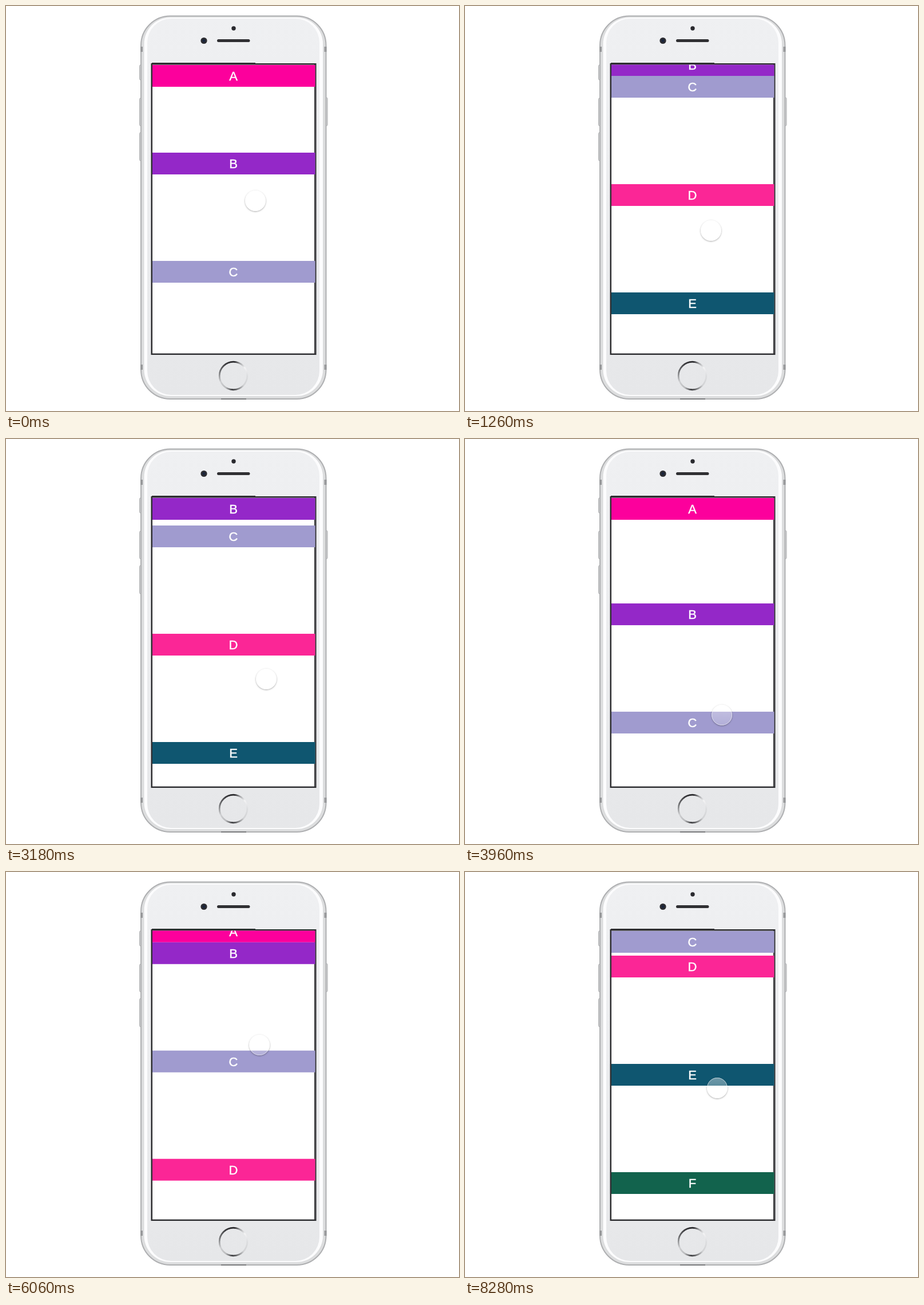
An HTML page with a canvas for the animation above (8340 ms loop, 792x707 px).

```html
<!DOCTYPE html>
<html lang="en">
<head>
<meta charset="utf-8">
<title>Sticky headers</title>
<style>
  html, body { margin: 0; width: 100%; height: 100%; overflow: hidden; background: #fff; }
  canvas { display: block; width: 792px; height: 707px; }
</style>
</head>
<body>
<canvas id="stage" width="792" height="707"></canvas>
<script>
const ctx = document.getElementById('stage').getContext('2d');
const LOOP = 8340, STEP = 60;
const TOP = 103, BAR = 38, SECTION = 189;
const colors = ['#fc009c', '#9428c8', '#a09bcf', '#fb2696', '#0f5670', '#12634d'];

// time, scroll offset, touch x, touch y
const keys = [
  [0, 36, 436, 340], [360, 150, 440, 226], [600, 215, 438, 270],
  [1060, 311, 428, 440], [1260, 359, 430, 392], [1560, 510, 440, 241],
  [1860, 590, 440, 330], [2160, 622, 450, 300], [2520, 647, 469, 173],
  [2820, 500, 462, 320], [3180, 330, 455, 419], [3500, 170, 452, 470],
  [3800, 45, 450, 480], [4020, 0, 449, 482], [4140, 0, 449, 482],
  [5220, 0, 423, 436], [5900, 146, 440, 290], [6240, 190, 445, 330],
  [6780, 235, 438, 456], [7020, 290, 445, 401], [7380, 405, 452, 286],
  [7740, 460, 446, 330], [8100, 480, 438, 421], [8280, 524, 441, 377]
];

function slope(i, c) {
  const a = keys[i], b = keys[i + 1];
  return a && b ? (b[c] - a[c]) / (b[0] - a[0]) : null;
}

// Monotone tangent: flat at turning points
function tangent(i, c) {
  const l = slope(i - 1, c), r = slope(i, c);
  if (l === null) return r;
  if (r === null) return l;
  return l * r <= 0 ? 0 : 2 * l * r / (l + r);
}

function valueAt(t, c) {
  let i = 0;
  while (i < keys.length - 2 && keys[i + 1][0] <= t) i++;
  const a = keys[i], b = keys[i + 1], h = b[0] - a[0];
  const u = Math.min(1, (t - a[0]) / h), v = 1 - u;
  return v * v * (1 + 2 * u) * a[c] + u * u * (3 - 2 * u) * b[c]
    + h * u * v * (v * tangent(i, c) - u * tangent(i + 1, c));
}

function rect(x, y, w, h, fill) {
  ctx.fillStyle = fill;
  ctx.fillRect(x, y, w, h);
}

function round(x, y, w, h, r, fill, stroke, line = 1) {
  ctx.beginPath();
  ctx.roundRect(x, y, w, h, r);
  if (fill) { ctx.fillStyle = fill; ctx.fill(); }
  if (stroke) { ctx.strokeStyle = stroke; ctx.lineWidth = line; ctx.stroke(); }
}

function disc(x, y, r, fill) {
  ctx.beginPath();
  ctx.arc(x, y, r, 0, Math.PI * 2);
  ctx.fillStyle = fill;
  ctx.fill();
}

function ramp(gradient, stops) {
  stops.forEach(([at, color]) => gradient.addColorStop(at, color));
  return gradient;
}

function drawBody() {
  [[233.5, 103, 26], [233.5, 161, 48], [233.5, 221, 49], [558, 160, 49]].forEach(
    ([x, y, h]) => round(x, y, 4, h, 1.5, '#dedfe0', '#a4a5a7'));

  round(236, 17.5, 323.5, 668.5, 51, '#dcddde', '#aeafb1', 2);
  [71, 626].forEach(y => {
    rect(235, y, 4, 9, '#98999b');
    rect(556.5, y, 4, 9, '#98999b');
  });
  rect(376, 685, 44, 2, '#77787a');

  round(241.5, 20, 312.5, 661, 46, '#fcfcfd');
  const face = ramp(ctx.createLinearGradient(0, 22, 0, 680), [[0, '#eff0f2'], [1, '#e6e7e9']]);
  round(247, 22, 301, 657, 42, face);

  disc(398, 39, 3.7, '#29292e');
  disc(346, 60.5, 5.6, '#2b2c32');
  disc(346, 60.5, 2.4, '#18243c');
  round(369, 58, 57.5, 5, 2.5, '#303033');
}

function drawHome() {
  const ring = ramp(ctx.createConicGradient(0, 397.5, 645.5), [
    [0, '#dcdddf'], [.12, '#d2d3d5'], [.2, '#77787a'], [.26, '#38383b'],
    [.34, '#b9babc'], [.43, '#cfd0d2'], [.54, '#77787a'], [.66, '#3a3a3d'],
    [.76, '#222225'], [.83, '#a5a6a8'], [.9, '#f4f4f5'], [1, '#dcdddf']
  ]);
  ctx.beginPath();
  ctx.arc(397.5, 645.5, 24.3, 0, Math.PI * 2);
  ctx.strokeStyle = ring;
  ctx.lineWidth = 2.7;
  ctx.stroke();
}

function drawScreen() {
  rect(253.5, 100, 289, 509, '#2d2d30');
  rect(255, 99, 181, 2, '#2d2d30');
  rect(256, 102.6, 283, 503.9, '#fff');
  rect(540.2, 102.6, .7, 504, '#77787a');
}

function drawBar(i, y) {
  rect(256, y, 284.5, BAR, colors[i]);
  const letter = String.fromCharCode(65 + i);
  ctx.fillStyle = ctx.strokeStyle = '#fff';
  ctx.lineWidth = .45;
  ctx.fillText(letter, 397.5, y + 27);
  ctx.strokeText(letter, 397.5, y + 27);
}

function drawBars(scroll) {
  ctx.save();
  ctx.beginPath();
  ctx.rect(255, TOP - .4, 287, 504.4);
  ctx.clip();
  ctx.font = '22px "Liberation Sans", Arial, sans-serif';
  ctx.textAlign = 'center';
  for (let i = 0; i < colors.length; i++) {
    const flow = TOP + SECTION * i - scroll;
    const next = i < colors.length - 1 ? flow + SECTION : Infinity;
    const y = Math.min(Math.max(flow, TOP), next - BAR);
    if (y > TOP - BAR && y < 608) drawBar(i, y);
  }
  ctx.restore();
}

function drawTouch(x, y) {
  const r = 18;
  ctx.save();
  ctx.beginPath();
  ctx.rect(x - 40, y - 40, 80, 80);
  ctx.arc(x, y, r, 0, Math.PI * 2);
  ctx.clip('evenodd');
  ctx.shadowColor = 'rgba(0,0,0,.42)';
  ctx.shadowBlur = 3;
  ctx.shadowOffsetY = 1;
  disc(x, y, r - .3, '#fff');
  ctx.restore();

  disc(x, y, r, ramp(ctx.createLinearGradient(0, y - r, 0, y + r),
    [[0, 'rgba(255,255,255,.4)'], [1, 'rgba(255,255,255,.2)']]));
  ctx.beginPath();
  ctx.arc(x, y, r - .5, 0, Math.PI * 2);
  ctx.strokeStyle = 'rgba(255,255,255,.5)';
  ctx.lineWidth = 1;
  ctx.stroke();
}

function draw(time) {
  const t = Math.floor((time % LOOP) / STEP) * STEP;
  rect(0, 0, 792, 707, '#fff');
  drawBody();
  drawHome();
  drawScreen();
  drawBars(valueAt(t, 1));
  drawTouch(valueAt(t, 2), valueAt(t, 3));
}

const start = performance.now();
function tick() {
  draw(performance.now() - start);
  requestAnimationFrame(tick);
}
tick();
</script>
</body>
</html>
```
